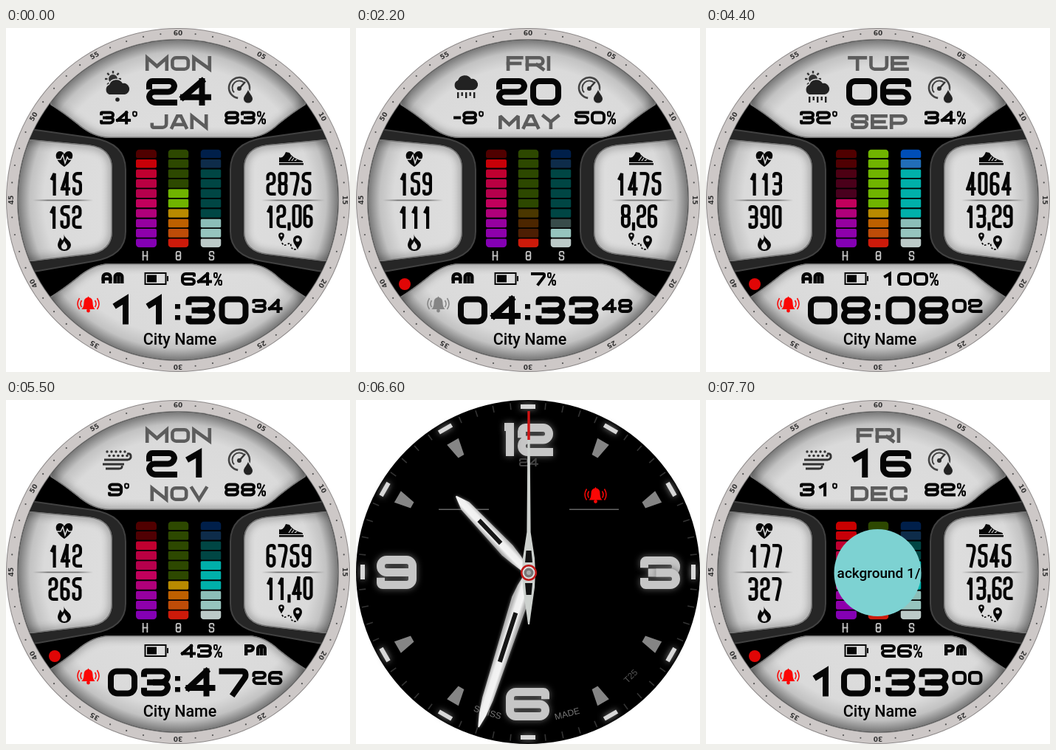
Animation of 466x466 px, one loop 8000 ms. Source, as an HTML page with a canvas:

```html
<!DOCTYPE html>
<html lang="en">
<head>
<meta charset="utf-8">
<title>Watch face</title>
<style>
html, body { margin: 0; width: 100%; height: 100%; overflow: hidden; background: #fff; }
canvas { display: block; width: 466px; height: 466px; }
</style>
</head>
<body>
<canvas id="stage" width="466" height="466"></canvas>
<script>
const ctx = document.getElementById('stage').getContext('2d');
const C = 233, TAU = Math.PI * 2, STEP = 550, LOOP = 8000;
const INK = '#050505', RED = '#fb0705';

// weekday day month temp humidity pulse kcal steps km pulseBars stepBars battery half time link alarm sky
const STATES = `
MON 24 JAN 34 83 145 152 2875 12,06 9 3 64 AM 113034 0 1 drop
TUE 15 FEB 12 61 132 274 5310 7,48 7 5 48 AM 092517 0 1 rain
WED 09 MAR 18 45 118 206 3642 4,95 5 4 81 AM 074122 0 1 both
SAT 23 APR 21 57 164 318 6120 9,37 9 6 35 AM 061840 1 1 drop
FRI 20 MAY -8 50 159 111 1475 8,26 9 2 7 AM 043348 1 0 rain
SUN 12 JUN 27 39 136 243 2208 3,74 8 3 52 AM 052916 0 0 both
SUN 10 JUL 0 71 123 351 862 1,32 5 1 74 AM 045508 0 0 drop
THU 18 AUG 29 66 151 287 3954 6,81 9 4 90 AM 101635 0 1 rain
TUE 06 SEP 32 34 113 390 4064 13,29 5 10 100 AM 080802 1 1 both
WED 12 OCT 16 78 128 172 5837 10,54 6 5 67 AM 095143 1 1 drop
MON 21 NOV 9 88 142 265 6759 11,40 8 6 43 PM 034726 1 1 wind
FRI 16 DEC 31 82 177 327 7545 13,62 10 6 26 PM 103300 1 1 wind
`.trim().split('\n').map(row => row.split(' '));

// Strokes on an 8 by 8 grid, "!" keeps corners sharp.
const GLYPHS = {
  0: '408088080040', 1: '!225058', 2: '02008084040888', 3: '0100808424 4484880807',
  4: '!6860068686', 5: '80000383880806', 6: '81800008888404', 7: '00808248',
  8: '408084040040 448488080444', 9: '07088880000484',
  A: '!08305088 1666', B: '0400808404088884', C: '828000088886', D: '!0008 00808808',
  E: '!80000888 0474', F: '!80000008 0474', G: '82800008888454', H: '0008 8088 0484',
  I: '4048', J: '80880806', L: '!000888', M: '!0800468088', N: '!08008880',
  O: '408088080040', P: '!0008 00808505', R: '!0008 00808505 !5588',
  S: '82800004848806', T: '0080 4048', U: '00088880', V: '!004880',
  W: '!0028426880', Y: '!004480 4448', a: '08008088 0585', m: '08008088 4048',
  '-': '0484', ',': '!4749', '°': '408083030040', '%': '203033030020 !7118 658588585565'
};
GLYPHS.S = '82800004848808' + '06';
GLYPHS[4] = '!6860 !6006 0686';
const WIDTHS = { M: 1.2, W: 1.25, F: .88, E: .95, L: .9, I: 0, '-': .5, ',': .3, '°': .34, '%': .6 };

function trace(pts, r) {
  const gap = (a, b) => Math.hypot(a[0] - b[0], a[1] - b[1]);
  ctx.beginPath();
  ctx.moveTo(...pts[0]);
  for (let i = 1; i < pts.length - 1; i++) {
    const k = Math.min(r, gap(pts[i], pts[i - 1]) * .6, gap(pts[i], pts[i + 1]) * .5);
    ctx.arcTo(...pts[i], ...pts[i + 1], k);
  }
  ctx.lineTo(...pts[pts.length - 1]);
  ctx.stroke();
}

function glyph(ch, x, y, f) {
  const thin = ch === '%' || ch === '°';
  const lw = thin ? Math.min(f.lw, 2) : f.lw;
  const W = Math.max(0, glyphWidth(ch, f) - lw), H = f.h - lw;
  ctx.lineWidth = lw;
  for (const part of GLYPHS[ch].split(' ')) {
    const pts = part.replace('!', '').match(/../g)
      .map(p => [x + lw / 2 + W * p[0] / 8, y + lw / 2 + H * p[1] / 8]);
    trace(pts, part[0] === '!' ? 0 : f.r);
  }
}

const glyphWidth = (ch, f) => Math.max(f.lw, f.w * (WIDTHS[ch] ?? 1));

// align: 0 left, .5 centre
function write(s, x, y, f, color = INK, align = .5) {
  const chars = [...s];
  const total = chars.reduce((n, ch) => n + glyphWidth(ch, f) + f.gap, -f.gap);
  ctx.save();
  ctx.strokeStyle = color;
  ctx.lineCap = 'square';
  ctx.miterLimit = 2.5;
  x -= total * align;
  for (const ch of chars) {
    glyph(ch, x, y, f);
    x += glyphWidth(ch, f) + f.gap;
  }
  ctx.restore();
}

const font = (w, h, lw, gap, r) => ({ w, h, lw, gap, r });
const WEEK = font(26, 20, 4.6, 3, 5), MONTH = font(24, 20, 4.6, 3, 5);
const DATE = font(42, 37, 8, 4, 9), CLOCK = font(40, 38, 8, 5, 9), SECS = font(19.5, 19, 4.2, 2, 4.5);
const SMALL = font(20, 18, 4, 2, 4.5), SLIM = font(13, 32, 4.2, 3, 4.5), KM = font(13, 32, 4.2, 2, 4.5);
const HALF = font(14, 15, 4.4, 2, 4), LABEL = font(7.5, 13, 1.8, 1, 2);

function at(x, y, draw, angle = 0) {
  ctx.save();
  ctx.translate(x, y);
  ctx.rotate(angle);
  draw();
  ctx.restore();
}
function fill(d, color) {
  ctx.fillStyle = color;
  ctx.fill(new Path2D(d));
}
function stroke(d, color, lw) {
  ctx.strokeStyle = color;
  ctx.lineWidth = lw;
  ctx.stroke(new Path2D(d));
}
function disc(x, y, r, color) {
  ctx.fillStyle = color;
  ctx.beginPath();
  ctx.arc(x, y, r, 0, TAU);
  ctx.fill();
}
function rect(x, y, w, h, color) {
  ctx.fillStyle = color;
  ctx.fillRect(x, y, w, h);
}
function label(s, x, y, style, color) {
  ctx.font = style;
  ctx.fillStyle = color;
  ctx.textAlign = 'center';
  ctx.textBaseline = 'alphabetic';
  ctx.fillText(s, x, y);
}

const TOP = 'M60 104Q76 114 96 130Q118 149 140 149H328Q350 149 370 130Q390 114 406 104V0H60Z';
const BOTTOM = 'M60 364Q76 354 96 338Q118 319 140 319H328Q350 319 370 338Q390 354 406 364V466H60Z';
const SIDE = 'M0 151H34L112 158Q144 162 144 190V276Q144 303 112 307L36 316H0Z';
const FRAME = 'M0 134L40 138L118 149Q162 156 162 192V276Q162 309 118 316L44 329L0 334Z';

function panel(d) {
  const p = new Path2D(d);
  const g = ctx.createRadialGradient(C, C, 80, C, C, 217);
  g.addColorStop(0, '#dedede');
  g.addColorStop(.74, '#dadada');
  g.addColorStop(.88, '#c2c2c2');
  g.addColorStop(1, '#777');
  ctx.save();
  ctx.clip(p);
  ctx.fillStyle = g;
  ctx.fill(p);
  ctx.shadowColor = '#222';
  ctx.shadowBlur = 12;
  ctx.strokeStyle = '#777';
  ctx.lineWidth = 3;
  ctx.stroke(p);
  ctx.restore();
}

function bezel() {
  disc(C, C, 233, '#8c8888');
  disc(C, C, 232, '#cdc8c7');
  for (let i = 0; i < 60; i++) {
    const a = i * TAU / 60;
    if (i % 5) disc(C + 226 * Math.sin(a), C - 226 * Math.cos(a), 1.1, '#555');
    else at(C, C, () => label(String(i || 60).padStart(2, '0'), 0, -223, 'bold 9px "DejaVu Sans", sans-serif', '#333'), a);
  }
  disc(C, C, 218, '#777');
  disc(C, C, 217, '#000');
}

function mirror(draw) {
  draw();
  ctx.save();
  ctx.translate(466, 0);
  ctx.scale(-1, 1);
  draw();
  ctx.restore();
}

function divider(x0, x1) {
  const g = ctx.createLinearGradient(x0, 0, x1, 0);
  g.addColorStop(0, '#7770');
  g.addColorStop(.25, '#777');
  g.addColorStop(.75, '#777');
  g.addColorStop(1, '#7770');
  rect(x0, 232.5, x1 - x0, 1.8, g);
}

function body() {
  bezel();
  ctx.save();
  ctx.beginPath();
  ctx.arc(C, C, 217, 0, TAU);
  ctx.clip();
  panel(TOP);
  panel(BOTTOM);
  mirror(() => {
    fill(FRAME, '#262626');
    stroke(FRAME, '#414141', 2);
    panel(SIDE);
  });
  ctx.restore();
  divider(36, 118);
  divider(346, 432);
}

const BARS = [
  [[200, 0, 0], [200, 0, 8], [192, 0, 48], [186, 0, 66], [182, 0, 76], [194, 0, 92], [176, 0, 122], [150, 0, 160], [142, 0, 172], [132, 0, 180]],
  [...Array(6).fill([112, 180, 0]), [184, 138, 0], [190, 96, 0], [190, 76, 8], [204, 26, 10]],
  [[0, 78, 184], [34, 110, 184], ...Array(5).fill([0, 176, 170]), [140, 190, 184], [150, 196, 190], [188, 202, 200]]
];

function bar(col, x, lit) {
  ctx.save();
  ctx.beginPath();
  ctx.roundRect(x, 164.5, 28, 133, 5);
  ctx.clip();
  BARS[col].forEach((rgb, i) => {
    const k = i >= 10 - lit ? 1 : .4;
    ctx.fillStyle = `rgb(${rgb.map(v => v * k)})`;
    ctx.beginPath();
    ctx.roundRect(x, 164.5 + i * 13.45, 28, 11.6, 2);
    ctx.fill();
  });
  ctx.restore();
}

const DROP = 'M0-8C2-3 6 0 6 4A6 5.5 0 0 1-6 4C-6 0-2-3 0-8Z';
const PIN = 'M0 10C-2 5-6 2-6-3A6 6 0 0 1 6-3C6 2 2 5 0 10Z';
const CLOUD = 'M-11 9A7 7 0 0 1-11-4A10 10 0 0 1 7-6A7.5 7.5 0 0 1 10 9Z';

function bell(x, y, color) {
  at(x, y, () => {
    fill('M-9 7Q-6 4-6-2Q-6-8-1-9Q0-12 1-9Q6-8 6-2Q6 4 9 7Z', color);
    disc(0, 9, 2.4, color);
    mirrorWaves(color);
  });
}
function mirrorWaves(color) {
  for (const s of [-1, 1]) {
    stroke(`M${s * 9}-5Q${s * 12} 0 ${s * 9} 4M${s * 12}-8Q${s * 17} 0 ${s * 12} 7`, color, 1.5);
  }
}

function sky(kind) {
  if (kind === 'wind') {
    at(150, 80, () => {
      for (let i = 0; i < 5; i++) {
        disc(-13 + i * 6, -10, 1.7, '#333');
        disc(-10 + i * 6, -4.5, 1.7, '#333');
      }
      stroke('M-17 1H15Q20 0 19-5Q18-8 14-7M-19 7H10M-15 13H3Q8 13 7 9', '#333', 2.8);
    });
    return;
  }
  const sunny = kind !== 'rain';
  if (sunny) at(145, 69, () => {
    disc(0, 0, 6, '#333');
    for (let i = 0; i < 8; i++) {
      ctx.rotate(TAU / 8);
      rect(-1.2, -11, 2.4, 3.5, '#333');
    }
  });
  at(sunny ? 151 : 149, sunny ? 81 : 75, () => {
    if (sunny) stroke(CLOUD, '#d6d6d6', 3);
    fill(CLOUD, '#222');
    if (kind === 'drop') disc(0, 16, 2.8, '#222');
    else for (let i = -2; i < 3; i++) rect(i * 5.5 - 1, 12, 2.4, i % 2 ? 5 : 8, '#222');
  });
}

function gauge() {
  at(316, 81, () => {
    ctx.strokeStyle = '#444';
    ctx.lineWidth = 2.6;
    ctx.beginPath();
    ctx.arc(0, 0, 14, 1.7, TAU + .3);
    ctx.stroke();
    ctx.lineWidth = 2;
    ctx.beginPath();
    ctx.arc(0, 0, 9.5, 2.4, TAU - .9);
    ctx.stroke();
    stroke('M0 1L8-8', '#333', 2.5);
    disc(0, 1, 3, '#333');
  });
  at(328, 92, () => {
    stroke(DROP, '#d6d6d6', 3);
    fill(DROP, '#222');
  });
}

function sideIcons() {
  at(79, 177, () => {
    fill('M0 11C-16 0-12-10-6-10Q-2-10 0-6Q2-10 6-10C12-10 16 0 0 11Z', INK);
    stroke('M-13 1H-5L-2-5L1 6L4-2L6 1H13', '#ddd', 1.5);
  });
  at(79, 291, () => {
    fill('M-1-12C1-5 9-3 9 3A9 8 0 0 1-9 3C-9-1-6-4-6-7C-4-5-3-4-3-3C0-5 0-9-1-12Z', INK);
    fill('M0-3C0 0 4 2 4 5A4 4 0 0 1-4 5C-4 2-1 1 0-3Z', '#d8d8d8');
  });
  at(386, 177, () => {
    fill('M-16-2C-12 0-9-4-7-9L-2-8C1-3 6 0 12 2Q17 3 16 5H-16Z', INK);
    rect(-16, 6, 33, 2.5, INK);
    stroke('M-3 3L1-3M1 3L4-1M5 3L8 1', '#ddd', 1.2);
  });
  at(395, 290, () => {
    fill(PIN, INK);
    disc(0, -3, 2.5, '#d8d8d8');
  });
  at(373, 283, () => {
    ctx.scale(.65, .65);
    fill(PIN, INK);
    disc(0, -3, 2.3, '#d8d8d8');
  });
  ctx.setLineDash([2.5, 2]);
  stroke('M374 291Q376 296 381 293Q386 290 386 295Q386 300 394 300', INK, 1.8);
  ctx.setLineDash([]);
}

function dial(s) {
  const [week, day, month, temp, hum, pulse, kcal, steps, km, pBars, sBars, batt, half, time, link, alarm, weather] = s;
  body();
  write(week, 233.5, 38, WEEK, '#5c5c5c');
  write(day, 234, 68, DATE);
  write(month, 234.5, 117, MONTH, '#5c5c5c');
  write(temp + '°', 152.5, 112.5, SMALL);
  write(hum + '%', 324, 112.5, SMALL);
  sky(weather);
  gauge();

  sideIcons();
  write(pulse, 80.5, 195, SLIM);
  write(kcal, 80, 240, SLIM);
  write(steps, 383, 195, SLIM);
  write(km, 383.5, 239, KM);

  bar(0, 176, +pBars);
  bar(1, 219.5, Math.max(1, Math.floor(batt / 10)));
  bar(2, 263.5, +sBars);
  [...'HBS'].forEach((ch, i) => write(ch, 188.5 + i * 45, 302, LABEL, '#c4c4c4'));

  write(half === 'AM' ? 'am' : 'Pm', half === 'AM' ? 144.5 : 338, 331, HALF);
  stroke('M188.5 332H216.5V347H188.5Z', INK, 2);
  rect(191, 334.5, 13, 10, INK);
  rect(218, 336, 2, 7, INK);
  write(batt + '%', 237, 331, SMALL, INK, 0);

  write(time.slice(0, 2), 138, 363.5, CLOCK, INK, 0);
  write(time.slice(2, 4), 243.5, 363.5, CLOCK, INK, 0);
  rect(229, 374, 7, 6.5, INK);
  rect(229, 389, 7, 6.5, INK);
  write(time.slice(4), 333.5, 367, SECS, INK, 0);
  bell(111.5, 374, +alarm ? RED : '#858585');
  if (+link) disc(66, 347, 8, '#e00606');
  label('City Name', 235.5, 429, '500 21.5px Roboto, sans-serif', '#000');
}

function toast() {
  ctx.save();
  disc(232.5, 234, 59, '#7dd2d2');
  ctx.clip();
  label('ackground 1/', 234, 241, '500 19px Roboto, sans-serif', '#000');
  ctx.restore();
}

function shape(pts, color) {
  ctx.beginPath();
  for (const [r, w] of pts) ctx.lineTo(-w, -r);
  for (const [r, w] of [...pts].reverse()) ctx.lineTo(w, -r);
  ctx.closePath();
  ctx.fillStyle = color;
  ctx.fill();
}

function hand(deg, pts, slot) {
  at(234, 234, () => {
    ctx.shadowColor = '#777';
    ctx.shadowBlur = 4;
    const g = ctx.createLinearGradient(-9, 0, 9, 0);
    g.addColorStop(0, '#aaa');
    g.addColorStop(.3, '#f4f4f4');
    g.addColorStop(.7, '#f0f0f0');
    g.addColorStop(1, '#b4b4b4');
    shape(pts, g);
    ctx.shadowBlur = 0;
    rect(-3, -slot[1], 6, slot[1] - slot[0], '#161616');
  }, deg * TAU / 360);
}

function secondHand(deg) {
  at(234, 234, () => {
    shape([[70, 1], [55, 3], [20, 8], [0, 9], [-20, 8], [-55, 2.6], [-180, 1.6]].map(([r, w]) => [-r, w]), '#cdd1ce');
    shape([[180, 1.7], [219, 1.7]], '#d01414');
    shape([[14, 5], [30, 3.5]], '#111');
    shape([[-14, 5], [-30, 3.5]], '#111');
  }, deg * TAU / 360);
  disc(234, 234, 11, '#c01818');
  disc(234, 234, 8.5, '#ddd');
  disc(234, 234, 6.5, '#777');
  disc(234, 234, 3, '#aaa');
}

function analog(hour, minute, second) {
  disc(C, C, 233, '#000');
  for (let i = 0; i < 60; i++) {
    at(C, C, () => {
      if (i % 5) return rect(-.8, -230, 1.6, 9, '#343434');
      ctx.save();
      ctx.shadowColor = '#888';
      ctx.shadowBlur = 9;
      rect(-10, -227, 20, 6, '#d8d8d8');
      ctx.restore();
      if (i % 15) shape([[181, 4.5], [204, 9]], '#858585');
    }, i * TAU / 60);
  }
  ctx.save();
  ctx.shadowColor = '#666';
  ctx.shadowBlur = 10;
  const big = font(50, 44, 11, 3, 8);
  write('2', 243, 32, font(48, 44, 11, 0, 8), '#c6c6c6');
  stroke('M201 36.5H208.5V76', '#c6c6c6', 11);
  write('3', 412, 212, font(54, 44, 11, 0, 8), '#c6c6c6');
  write('6', 232.5, 390, font(59, 44, 11, 0, 8), '#c6c6c6');
  write('9', 55, 211, font(54, 45, 11, 0, 8), '#c6c6c6');
  ctx.restore();
  write('24', 234, 79, font(12, 11, 2, 2, 2), '#444');
  rect(112, 147.5, 68, 1.5, '#666');
  rect(289, 147.5, 67, 1.5, '#666');
  const tiny = '12px "Liberation Sans", Arial, sans-serif';
  at(177, 427, () => label('SWISS', 0, 0, tiny, '#777'), .3);
  at(287, 429, () => label('MADE', 0, 0, tiny, '#777'), -.26);
  at(375, 377, () => label('T25', 0, 0, tiny, '#555'), -.78);
  bell(324.5, 128.5, RED);
  hand(hour, [[0, 4], [25, 8], [42, 10], [125, 7.5], [143, .8]], [55, 98]);
  hand(minute, [[0, 4], [20, 9], [38, 11.5], [180, 7.5], [202, 5], [220, .8]], [57, 127]);
  secondHand(second);
}

function render(i) {
  ctx.fillStyle = '#fff';
  ctx.fillRect(0, 0, 466, 466);
  if (i === 12) analog(316.5, 198, 0);
  else if (i === 13) analog(344.7, 179.7, 203.8);
  else dial(STATES[Math.min(i, 11)]);
  if (i === 14) toast();
}

let shown = -1;
function tick(now) {
  const i = Math.floor((now % LOOP) / STEP);
  if (i !== shown) render(shown = i);
  requestAnimationFrame(tick);
}
tick(performance.now());
</script>
</body>
</html>
```
